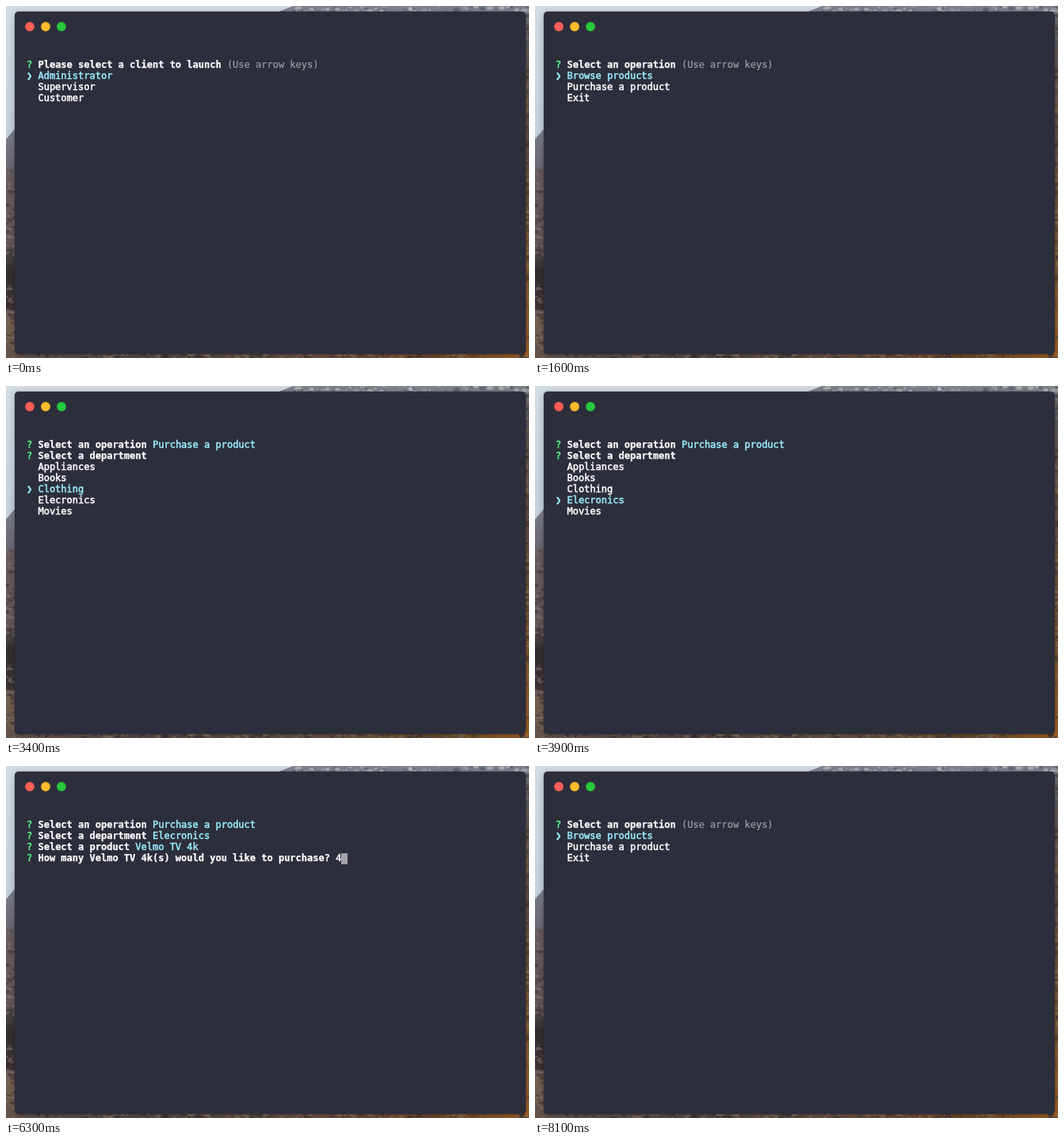
Recreate the animation shown at these times as an HTML page. Size 660 by 444 pixels, loop 8200 ms.

```html
<!DOCTYPE html>
<html lang="en">
<head>
<meta charset="utf-8">
<title>Store prompt</title>
<style>
  html, body { margin: 0; width: 100%; height: 100%; overflow: hidden; }
  #stage { position: relative; width: 660px; height: 444px; overflow: hidden; background: #4b4141; }
  svg { position: absolute; inset: 0; }
  #window {
    position: absolute; left: 11px; top: 7px; width: 645px; height: 432px;
    border-radius: 5px; background: #2d2e3b;
    box-shadow: 0 0 1px rgba(0, 0, 0, .6), 0 2px 8px rgba(0, 0, 0, .25);
  }
  #window i {
    position: absolute; top: 13px; width: 12px; height: 12px; border-radius: 50%;
    box-shadow: inset 0 0 0 .6px rgba(0, 0, 0, .2);
  }
  #screen {
    position: absolute; left: 26px; top: 67px; margin: 0; color: #fff;
    font: 12px/14px "DejaVu Sans Mono", monospace;
    white-space: pre; font-variant-ligatures: none;
    -webkit-text-stroke: .5px currentColor;
  }
  #screen b { -webkit-text-stroke-width: .25px; }
  .mark { color: #5af78e; }
  .pick { color: #9aedfe; }
  .hint { color: #a0a1a6; -webkit-text-stroke-width: .15px; }
  .cursor { display: inline-block; width: 8px; height: 14px; background: #a3a3a8; vertical-align: top; position: relative; top: 1px; }
</style>
</head>
<body>
<div id="stage">
  <svg width="660" height="444">
    <defs>
      <linearGradient id="sky" x2="0" y2="1">
        <stop stop-color="#d3dce3"/><stop offset="1" stop-color="#c3d0da"/>
      </linearGradient>
      <linearGradient id="left" x2="0" y2="1">
        <stop stop-color="#7b7f89"/><stop offset=".17" stop-color="#6b6974"/>
        <stop offset=".2" stop-color="#665a5e"/><stop offset=".5" stop-color="#625658"/>
        <stop offset=".62" stop-color="#332d30"/><stop offset=".78" stop-color="#3a3131"/>
        <stop offset=".84" stop-color="#75604f"/><stop offset="1" stop-color="#5f4f48"/>
      </linearGradient>
      <linearGradient id="right" x2="0" y2="1">
        <stop stop-color="#7c8087"/><stop offset=".1" stop-color="#55565c"/>
        <stop offset=".2" stop-color="#655449"/><stop offset=".5" stop-color="#674a39"/>
        <stop offset=".8" stop-color="#83572f"/><stop offset="1" stop-color="#9c5d25"/>
      </linearGradient>
      <linearGradient id="floor">
        <stop stop-color="#65544c"/><stop offset=".3" stop-color="#544643"/>
        <stop offset=".6" stop-color="#65503f"/><stop offset=".85" stop-color="#6c4a2a"/>
        <stop offset="1" stop-color="#9c5d25"/>
      </linearGradient>
    </defs>
    <rect width="660" height="170" fill="url(#sky)"/>
    <path d="M0 168L14 152V444H0z" fill="url(#left)"/>
    <path d="M342 8L362 0H660V8z" fill="#7d838b"/>
    <rect x="652" width="8" height="444" fill="url(#right)"/>
    <rect y="436" width="660" height="8" fill="url(#floor)"/>
    <g id="rocks"></g>
  </svg>
  <div id="window">
    <i style="left:13px;background:#ff5f57"></i>
    <i style="left:33px;background:#ffbd2e"></i>
    <i style="left:53px;background:#28c940"></i>
  </div>
  <pre id="screen"></pre>
</div>
<script>
const LOOP = 8200;
const CLIENTS = ['Administrator', 'Supervisor', 'Customer'];
const OPERATIONS = ['Browse products', 'Purchase a product', 'Exit'];
const DEPARTMENTS = ['Appliances', 'Books', 'Clothing', 'Elecronics', 'Movies'];
const PRODUCTS = ['Zunbuds', 'Velmo TV 4k', 'uDex Pro 3.2GHz Orvel Kyon W', 'Tavono X 64GB'];

const span = (name, text) => `<span class="${name}">${text}</span>`;
const ask = (text, rest = '') => `${span('mark', '?')} <b>${text}</b> ${rest}`;
const answer = (text, value) => ask(text, span('pick', value));

function menu(text, items, index, hint = index === 0) {
  const rows = items.map((item, i) => i === index ? span('pick', '❯ ' + item) : '  ' + item);
  return [ask(text, hint ? span('hint', '(Use arrow keys)') : ''), ...rows];
}

const client = i => menu('Please select a client to launch', CLIENTS, i);
const operation = i => menu('Select an operation', OPERATIONS, i);
const bought = [answer('Select an operation', OPERATIONS[1])];
const department = i => [...bought, ...menu('Select a department', DEPARTMENTS, i)];
const chosen = [...bought, answer('Select a department', DEPARTMENTS[3])];
const product = i => [...chosen, ...menu('Select a product', PRODUCTS, i)];
const quantity = rest => [
  ...chosen,
  answer('Select a product', PRODUCTS[1]),
  ask(`How many ${PRODUCTS[1]}(s) would you like to purchase?`, rest)
];
const cursor = span('cursor', '');

// Each step holds until the next start time, in ms.
const steps = [
  [0, client(0)], [500, client(1)], [800, client(2)],
  [1300, operation(0)], [1800, operation(1)],
  [2200, department(0)], [2900, department(1)], [3200, department(2)], [3600, department(3)],
  [4100, product(0)], [4600, product(1)],
  [5300, quantity(cursor)], [6000, quantity('4' + cursor)], [6800, quantity(span('pick', '4'))],
  [7800, operation(0)]
];

// Seeded flecks give the rock and snow some grain.
let seed = 11;
const random = () => (seed = seed * 16807 % 2147483647) / 2147483647;
function flecks(count, x, y, w, h, colors) {
  let out = '';
  for (let i = 0; i < count; i++) {
    const size = 1 + random() * 3;
    out += `<ellipse cx="${x + random() * w}" cy="${y + random() * h}" rx="${size}" ry="${size * .6}"
      fill="${colors[i % colors.length]}" opacity=".5"/>`;
  }
  return out;
}
document.getElementById('rocks').innerHTML =
  flecks(90, 365, 0, 295, 7, ['#d0d5da', '#4e545e', '#a3a8af']) +
  flecks(90, 0, 205, 11, 235, ['#857673', '#3b3337']) +
  flecks(80, 656, 10, 4, 430, ['#96714f', '#352c2c']) +
  flecks(140, 0, 439, 660, 5, ['#8f7864', '#352d2d']);

const screen = document.getElementById('screen');
let shown;
function draw(now) {
  const time = now % LOOP;
  const step = steps.findLast(([start]) => start <= time);
  if (step !== shown) {
    shown = step;
    screen.innerHTML = step[1].join('\n');
  }
  requestAnimationFrame(draw);
}
draw(performance.now());
</script>
</body>
</html>
```
